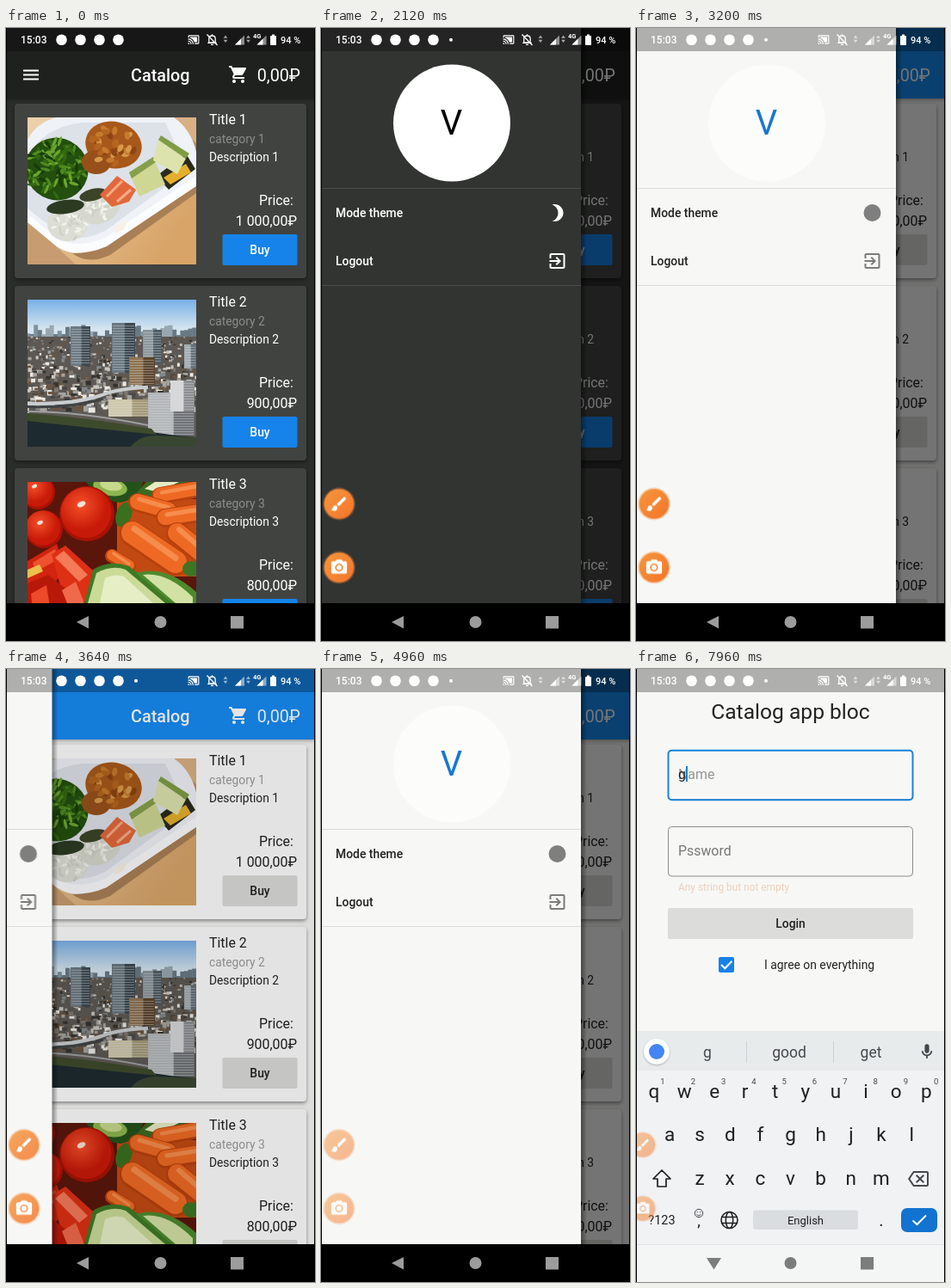
Animation, 359 px wide and 713 px high, one loop 8 s. Source, as an HTML page:

```html
<!DOCTYPE html>
<html lang="en">
<head>
<meta charset="utf-8">
<title>Catalog app bloc</title>
<style>
html, body { margin: 0; width: 100%; height: 100%; overflow: hidden; background: #000; }
svg { display: block; position: absolute; left: 0; top: 0; }
text { font-family: Roboto, "Open Sans", sans-serif; white-space: pre; }
.card { filter: drop-shadow(0 2px 2px rgba(0, 0, 0, .42)); }
</style>
</head>
<body>
<svg id="stage" width="359" height="713" viewBox="0 0 359 713"></svg>
<script>
const LOOP = 8000;
const stage = document.getElementById('stage');

// name: [dark, light]
const theme = {
  bar: ['#1f211f', '#168bf3'],
  page: ['#2b2d2b', '#f7f8f6'],
  card: ['#414341', '#fdfefd'],
  ink: ['#ffffff', '#212221'],
  sub: ['#8b8d8b', '#9a9b9a'],
  btn: ['#1683ea', '#dcdddb'],
  panel: ['#323432', '#f7f8f6'],
  face: ['#fefffe', '#fcfdfb'],
  letter: ['#000000', '#1976d2'],
  line: ['#4a4c4a', '#dcdddb'],
  icon: ['#ffffff', '#7b7c7b']
};

const rect = (x, y, w, h, fill, more = '') =>
  `<rect x="${x}" y="${y}" width="${w}" height="${h}" fill="${fill}" ${more}/>`;
const disc = (x, y, r, fill, more = '') =>
  `<circle cx="${x}" cy="${y}" r="${r}" fill="${fill}" ${more}/>`;
const oval = (x, y, rx, ry, fill, turn = 0) =>
  `<ellipse cx="${x}" cy="${y}" rx="${rx}" ry="${ry}" fill="${fill}" transform="rotate(${turn} ${x} ${y})"/>`;
const path = (d, fill, more = '') => `<path d="${d}" fill="${fill}" ${more}/>`;
const line = (d, color, w, more = '') =>
  path(d, 'none', `stroke="${color}" stroke-width="${w}" ${more}`);
const text = (x, y, size, str, fill, more = '') =>
  `<text x="${x}" y="${y}" font-size="${size}" fill="${fill}" ${more}>${str}</text>`;
const group = (id, body, more = '') => `<g id="${id}" ${more}>${body}</g>`;
const at = (x, y, body) => `<g transform="translate(${x} ${y})">${body}</g>`;
const MID = 'text-anchor="middle" ', END = 'text-anchor="end" ', BOLD = 'font-weight="500"';

const icons = {
  cart: 'M7 18c-1.1 0-2 .9-2 2s.9 2 2 2 2-.9 2-2-.9-2-2-2zM1 2v2h2l3.6 7.6-1.35 2.44C4.5 15.4 5.5 17 7 17h12v-2H7.4l-.2-.4.9-1.6h7.45c.75 0 1.4-.4 1.75-1L20.9 5.5A1 1 0 0 0 20 4H5.2l-.93-2zM17 18c-1.1 0-2 .9-2 2s.9 2 2 2 2-.9 2-2-.9-2-2-2z',
  moon: 'M9 2c-1.05 0-2.05.16-3 .46 4.06 1.27 7 5.06 7 9.54s-2.94 8.27-7 9.54c.95.3 1.95.46 3 .46 5.52 0 10-4.48 10-10S14.52 2 9 2z',
  exit: 'M10.1 15.6 11.5 17l5-5-5-5-1.4 1.4L12.7 11H3v2h9.7zM19 3H5c-1.1 0-2 .9-2 2v4h2V5h14v14H5v-4H3v4c0 1.1.9 2 2 2h14c1.1 0 2-.9 2-2V5c0-1.1-.9-2-2-2z',
  mic: 'M12 14c1.66 0 3-1.34 3-3V5c0-1.66-1.34-3-3-3S9 3.34 9 5v6c0 1.66 1.34 3 3 3zm5-3c0 2.76-2.24 5-5 5s-5-2.24-5-5H5c0 3.53 2.6 6.43 6 6.92V21h2v-3.08c3.4-.49 6-3.39 6-6.92z',
  erase: 'M22 3H7c-.7 0-1.23.35-1.6.88L0 12l5.4 8.1c.37.54.9.9 1.6.9h15c1.1 0 2-.9 2-2V5c0-1.1-.9-2-2-2zm0 16H7.07L2.4 12l4.66-7H22zM10.4 17l3.6-3.6 3.6 3.6 1.4-1.4-3.6-3.6L19 8.4 17.6 7 14 10.6 10.4 7 9 8.4l3.6 3.6L9 15.6z',
  camera: 'M12 15.2a3.2 3.2 0 1 0 0-6.4 3.2 3.2 0 0 0 0 6.4zM9 2 7.2 4H4c-1.1 0-2 .9-2 2v12c0 1.1.9 2 2 2h16c1.1 0 2-.9 2-2V6c0-1.1-.9-2-2-2h-3.2L15 2zm3 15c-2.76 0-5-2.24-5-5s2.24-5 5-5 5 2.24 5 5-2.24 5-5 5z',
  brush: 'M7 14c-1.66 0-3 1.34-3 3 0 1.3-1.16 2-2 2 .92 1.22 2.5 2 4 2 2.2 0 4-1.8 4-4 0-1.66-1.34-3-3-3zM20.7 4.6l-1.3-1.3a1 1 0 0 0-1.4 0l-9 9L11.75 15l9-9a1 1 0 0 0 0-1.4z',
  cast: 'M21 3H3c-1.1 0-2 .9-2 2v3h2V5h18v14h-7v2h7c1.1 0 2-.9 2-2V5c0-1.1-.9-2-2-2zM1 18v3h3c0-1.66-1.34-3-3-3zm0-4v2c2.76 0 5 2.24 5 5h2c0-3.87-3.13-7-7-7zm0-4v2a9 9 0 0 1 9 9h2c0-6-4.93-11-11-11zM5 7v1.6c4 1.3 7 4.4 8.4 8.4H19V7z'
};
// a 24-unit icon centred on x, y
const icon = (name, x, y, size, fill) =>
  `<path d="${icons[name]}" fill="${fill}" fill-rule="evenodd" transform="translate(${x - size / 2} ${y - size / 2}) scale(${size / 24})"/>`;

let seed = 7;
const rnd = () => (seed = (seed * 16807) % 2147483647) / 2147483647;
const pick = list => list[Math.floor(rnd() * list.length)];
// small ovals strewn inside a larger one
function strew(n, x, y, rx, ry, long, thin, tones) {
  let s = '';
  for (let i = 0; i < n; i++) {
    const a = rnd() * 6.28, r = Math.sqrt(rnd());
    s += oval((x + rx * r * Math.cos(a)).toFixed(1), (y + ry * r * Math.sin(a)).toFixed(1), long, thin, pick(tones), Math.round(rnd() * 180));
  }
  return s;
}

function meal() {
  const rice = ['#f3f3ee', '#cfd0c6', '#e6e7df'];
  return rect(0, 0, 196, 171, 'url(#wood)') +
    path('M128 0H196V66z', '#c08c5a') + path('M160 0H196V30z', '#d9b083') +
    path('M0 120 56 171H0z', '#c79c70') +
    path('M0 26Q10 6 34 0H170Q190 14 196 40V80L92 150Q58 166 34 150L0 122z', '#eff2f7') +
    path('M0 44Q22 10 64 6H160L186 62 90 132Q56 148 36 134L0 106z', '#dde1e8') +
    path('M0 112 34 140Q56 154 90 140L196 68V80L92 150Q58 166 34 150L0 122z', '#fbfcfe') +
    path('M52 158Q74 158 92 150L196 80V88L96 160Q70 172 52 158z', '#a97f55') +
    oval(47, 123, 24, 21, '#dcddd4', -10) + strew(40, 47, 124, 22, 18, 3.5, 1.5, rice) +
    oval(84, 104, 25, 19, '#d6d8cd', -25) + strew(40, 84, 104, 22, 16, 3.5, 1.5, rice) +
    oval(44, 104, 22, 8, '#2c3a22', -8) + oval(76, 90, 16, 7, '#3b4428', -14) +
    path('M84 90 104 68 126 84 118 98 98 104z', '#e2683c') + line('M92 92 110 74M104 98 120 84', '#f6ab86', 3) +
    path('M150 68 184 42 195 60 164 84z', '#2b2a1c') + path('M158 70 184 54 190 64 166 78z', '#e4b02c') +
    oval(34, 60, 37, 36, '#234f0f', 40) + strew(90, 33, 60, 35, 33, 6, 1.8, ['#4f8a20', '#173d0a', '#6ba52f', '#33690f']) +
    oval(100, 32, 33, 27, '#a8581a', 14) + oval(80, 52, 17, 14, '#98501a') +
    strew(34, 100, 32, 28, 22, 5, 3, ['#c67a2c', '#8c4412', '#d8994a', '#b4651f']) +
    path('M118 64 146 46 160 78 130 92z', '#cfd794') + path('M118 64 146 46 149 52 121 71z', '#86a04a') +
    path('M152 26 184 48 174 66 146 50z', '#dce3ac') + path('M152 26 184 48 188 42 155 21z', '#7f9c44') +
    path('M100 128 116 120 112 130 102 135z', '#f9f1e6');
}

function city() {
  const tones = ['#4c4844', '#c9c6bf', '#7f776e', '#a7a39d', '#36332f', '#eceae5', '#6b543f', '#82878a'];
  let s = rect(0, 0, 196, 171, 'url(#sky)');
  for (let i = 0; i < 44; i++) {
    const h = 4 + rnd() * 13;
    s += rect(i * 4.6 - 2, 46 - h, 5, h, pick(['#7f929f', '#687984', '#98a7b0']));
  }
  s += rect(0, 43, 196, 128, '#5d5853');
  for (let i = 0; i < 700; i++) {
    const y = 42 + i / 700 * 84, k = 1.5 + (y - 40) / 22;
    s += rect((rnd() * 200 - 4).toFixed(1), y.toFixed(1), (k * (.7 + rnd())).toFixed(1), (k * (.5 + rnd())).toFixed(1), pick(tones));
  }
  const tower = (x, y, w, h, fill, shade) => {
    s += rect(x, y, w, h, fill) + rect(x + w * .55, y, w * .45, h, shade);
    for (let j = 3; j < h - 1; j += 3) s += rect(x + 1, y + j, w - 2, 1, '#d4d9dc', 'opacity=".4"');
  };
  tower(50, 31, 23, 46, '#6d7a83', '#404c54');
  tower(98, 27, 27, 58, '#6b7881', '#3e4a52');
  tower(134, 35, 22, 40, '#8b969d', '#505d66');
  tower(118, 67, 30, 32, '#8f7350', '#5c452c');
  tower(182, 52, 14, 28, '#a2abb0', '#667077');
  tower(94, 116, 50, 20, '#cfc8ab', '#a69a79');
  tower(140, 108, 54, 50, '#b4b7b9', '#6f7377');
  tower(166, 94, 28, 36, '#d6d8d8', '#8b8f92');
  return s + path('M0 137Q60 143 144 154 170 158 196 160V171H0z', '#1d2a2f') +
    path('M0 132Q60 136 144 150L150 157Q70 149 0 141z', '#3d4a2c') +
    line('M0 121Q54 122 86 111 106 103 140 102', '#c9cdcf', 4) +
    line('M0 124.5Q56 126 88 115', '#3f4345', 3) +
    line('M0 130Q60 130 140 146', '#9c9f9e', 2) +
    path('M120 171Q130 158 150 158L196 160V171z', '#3a4730');
}

function veg() {
  const carrot = (x1, y1, x2, y2, w) =>
    line(`M${x1} ${y1}L${x2} ${y2}`, '#b8400c', w + 2, 'stroke-linecap="round"') +
    line(`M${x1} ${y1 - 1}L${x2} ${y2 - 1}`, '#ee6a24', w - 2, 'stroke-linecap="round"') +
    line(`M${x1 + 2} ${y1 - w * .2}L${x2} ${y2 - w * .2}`, '#f68d4c', w * .25, 'stroke-linecap="round"');
  const tomato = (x, y, r) => disc(x, y, r, '#a81205') + disc(x - 1, y - 1.5, r * .92, 'url(#tomato)') +
    oval(x - r * .2, y - r * .35, r * .16, r * .1, '#fde0d6', -25);
  return rect(0, 0, 196, 171, '#5a160b') + rect(104, 20, 92, 90, '#c24a12') +
    path('M68 0H134Q130 20 108 24 84 22 68 0z', '#24521a') + oval(96, 6, 20, 10, '#8db64e', 10) + oval(97, 4, 13, 6, '#c6d98c', 10) +
    path('M122 18 138 0H196V14L150 20z', '#3c6a22') + path('M136 8 148 0H176L152 12z', '#e6ebc2') +
    tomato(12, 12, 20) + tomato(19, 55, 22) + tomato(69, 37, 32) +
    oval(112, 38, 9, 15, '#39701f', 20) +
    carrot(154, 16, 200, 8, 18) + carrot(128, 24, 164, 34, 20) +
    carrot(160, 42, 200, 36, 20) + carrot(174, 60, 204, 84, 24) +
    carrot(122, 60, 172, 94, 28) + carrot(98, 86, 118, 98, 14) +
    path('M0 92 34 72 44 104 20 128 0 124z', '#d2240f') + path('M6 94 32 78 36 90 10 104z', '#ef5230') +
    path('M28 84 44 74 86 112 70 141 40 128z', '#dd3014') + path('M32 88 42 80 70 108 60 116z', '#f47a58') +
    path('M0 118 24 108 66 141V171H0z', '#b81808') + path('M4 130 22 120 30 171H8z', '#ec4a28') +
    path('M40 126 56 116 66 141H46z', '#f0694a') +
    path('M0 102 14 96 18 104 0 112z', '#ecc04a') +
    path('M76 102Q96 90 118 98L172 141H66z', '#3f7a26') + path('M80 106Q98 96 114 102L160 141H70z', '#cadb98') +
    path('M90 112Q102 106 112 110L146 141H84z', '#e6eec6') +
    path('M126 106Q160 96 196 128V141H168z', '#4d8a2e') + path('M134 108Q162 104 192 134V141H172z', '#d2e1a4') +
    oval(190, 101, 10, 9, '#3f7424');
}

function card(i, price, photo) {
  return at(0, i * 212,
    rect(10, 88, 339, 203, 'var(--card)', 'rx="4" class="card"') +
    at(25, 104, `<g clip-path="url(#frame)">${photo}</g>`) +
    text(236, 112, 15.9, 'Title ' + (i + 1), 'var(--ink)') +
    text(236, 134, 13.8, 'category ' + (i + 1), 'var(--sub)') +
    text(236, 155, 13.8, 'Description ' + (i + 1), 'var(--ink)') +
    text(294, 206, 15.9, 'Price:', 'var(--ink)') +
    text(338, 230, 15.9, price + '₽', 'var(--ink)', END) +
    rect(251.5, 240, 87, 36, 'var(--btn)', 'rx="2"') +
    text(295, 263, 13.9, 'Buy', 'var(--ink)', MID + BOLD));
}

const catalog = () => rect(0, 0, 359, 713, 'var(--page)') +
  card(0, '1 000,00', meal()) + card(1, '900,00', city()) + card(2, '800,00', veg()) +
  rect(0, 0, 359, 82, 'var(--bar)', 'style="filter:drop-shadow(0 1px 2px rgba(0,0,0,.35))"') +
  [48.5, 53.5, 58.5].map(y => rect(20, y, 18, 2, '#fff')).join('') +
  text(145, 62, 19.8, 'Catalog', '#fff', BOLD) +
  icon('cart', 270, 54, 24, '#fff') + text(342, 62, 19.8, '0,00₽', '#fff', END);

const drawer = () => rect(302, 0, 7, 713, 'url(#edge)') + rect(0, 0, 302, 713, 'var(--panel)') +
  disc(152, 110.5, 68, 'var(--face)') + text(151.5, 124, 40, 'V', 'var(--letter)', MID) +
  rect(0, 186, 302, 1, 'var(--line)') + rect(0, 299, 302, 1, 'var(--line)') +
  text(17, 220, 13.9, 'Mode theme', 'var(--ink)', BOLD) + text(17, 276, 13.9, 'Logout', 'var(--ink)', BOLD) +
  group('moon', icon('moon', 274.5, 215, 24, '#fff')) +
  group('sun', disc(274.5, 215, 10, '#7e7f7e')) + icon('exit', 274.5, 271, 24, 'var(--icon)');

const field = (y, more) => rect(37.5, y, 284, 57.5, 'none', 'rx="4" ' + more);
const login = () => rect(0, 0, 359, 713, '#f7f8f6') +
  text(179.5, 58, 24.6, 'Catalog app bloc', '#212221', MID) +
  field(94.5, 'stroke="#8b8c8b"') + group('focus', field(94.8, 'stroke="#1a82dc" stroke-width="2"')) +
  group('hint', text(49, 128, 15.9, 'Name', '#777877')) +
  group('typed', text(49, 128, 15.9, 'g', '#212221') + text(49, 258, 11.9, 'Any string but not empty', '#ecd0bc')) +
  group('caret', rect(49, 113, 2, 18, '#1a82dc')) +
  field(183.5, 'stroke="#8b8c8b"') + text(49, 217, 15.9, 'Pssword', '#777877') +
  rect(37, 278, 285, 36, '#dcdddb', 'rx="2"') + text(179.5, 301, 13.9, 'Login', '#212221', MID + BOLD) +
  rect(96, 335, 18, 18, '#1681ea', 'rx="2"') + line('M99 344 103.3 348.3 111.5 339.7', '#fff', 2) +
  text(149, 349, 13.9, 'I agree on everything', '#212221');

function keyboard() {
  const ink = '#1d1f20', soft = '#45494b';
  const row = (keys, x, y) => [...keys].map((k, i) => text(x + i * 35.15, y, 22.5, k, ink, MID)).join('');
  return rect(0, 421, 359, 292, '#f0f2f3') + rect(0, 421, 359, 46, '#e8ebec') +
    disc(24, 445, 15, '#fff', 'style="filter:drop-shadow(0 1px 1px rgba(0,0,0,.25))"') + disc(24, 445, 9, '#4285f4') +
    icon('mic', 338, 445, 21, soft) +
    group('words', rect(128, 433, 1, 25, '#cdd1d3') + rect(229, 433, 1, 25, '#cdd1d3') +
      text(83, 452, 17.5, 'g', soft, MID) + text(178, 452, 17.5, 'good', soft, MID) + text(273, 452, 17.5, 'get', soft, MID)) +
    row('qwertyuiop', 21, 499) + row('asdfghjkl', 39, 549) + row('zxcvbnm', 74, 600) +
    [...'1234567890'].map((k, i) => text(31 + i * 35.3, 483, 9.5, k, soft, MID)).join('') +
    path('M30 583 40 593H35V602H25V593H20z', 'none', `stroke="${ink}" stroke-width="1.7" stroke-linejoin="round"`) +
    icon('erase', 328, 593, 24, soft) +
    text(30, 646, 14.5, '?123', ink, MID) + text(73, 648, 18, ',', ink, MID) +
    disc(73, 633, 4.7, 'none', `stroke="${soft}"`) + line('M70.5 634.5Q73 637.5 75.5 634.5M71.2 631v1.4M74.8 631v1.4', soft, 1) +
    disc(108.5, 641, 9.5, 'none', `stroke="${ink}" stroke-width="1.6"`) +
    `<ellipse cx="108.5" cy="641" rx="4.2" ry="9.5" fill="none" stroke="${ink}" stroke-width="1.5"/>` +
    line('M100 637.5H117M100 644.5H117', ink, 1.5) +
    rect(136, 629.5, 122, 22.5, '#dadddf', 'rx="3"') + text(197, 646, 13, 'English', ink, MID) +
    text(285, 648, 20, '.', ink, MID) +
    rect(308, 627, 42, 28, '#1273d0', 'rx="7"') + line('M321.5 641.5 326.5 646 337 635.5', '#fff', 2);
}

function status() {
  const w = '#fff', arrows = x => path(`M${x} 8.5l2.4 3.2h-4.8zM${x} 17l2.4-3.2h-4.8z`, w, 'opacity=".6"');
  const signal = x => path(`M${x} 19.5h11v-11z`, w, 'opacity=".5"') + path(`M${x} 19.5h7v-7z`, w);
  return rect(0, 0, 359, 27, '#000', 'opacity=".29"') +
    text(17, 18.3, 12, '15:03', w, BOLD) +
    [64.5, 86.5, 108.5, 130.5].map(x => disc(x, 13.7, 6.3, w)).join('') +
    group('dot', disc(151, 13.7, 2, w)) +
    icon('cast', 218, 13.5, 14, w) +
    line('M235.8 17V12.5Q235.8 9 239.5 9T243.2 12.5V17zM234.3 17.3H244.7M239.5 7.2V9M238 19.3H241', w, 1.3) +
    line('M233.5 7.5 245.5 20', w, 1.3) +
    arrows(255) + signal(266) + arrows(281.5) + signal(291.5) +
    text(287, 12, 7.5, '4G', w, 'font-weight="700"') +
    rect(307, 9, 7, 11, w, 'rx="1"') + rect(309, 7.5, 3, 2, w) +
    text(319, 18, 11, '94 %', w, BOLD);
}

const marks = (back, fill) => path(back, fill) + disc(179.5, 691, 7, fill) + rect(261, 684, 15, 14.5, fill);
const floater = (id, y, name) => at(0, y, group(id,
  disc(0, 0, 18.8, '#f58a3c', 'opacity=".4"') + disc(0, 0, 17.2, 'url(#amber)') + icon(name, 0, 0, 22, '#fff'), 'class="float"'));
const stops = (a, b) => `<stop stop-color="${a}"/><stop offset="1" stop-color="${b}"/>`;
const grad = (id, dir, a, b) => `<linearGradient id="${id}" x1="0" y1="0" ${dir}>${stops(a, b)}</linearGradient>`;

stage.innerHTML = '<defs>' +
  grad('sky', 'x2="0" y2=".2"', '#79b0e6', '#d6e5ef') +
  grad('wood', 'x2="1" y2=".6"', '#ecd2ae', '#d8a468') +
  grad('edge', 'x2="1" y2="0"', 'rgba(0,0,0,.4)', 'rgba(0,0,0,0)') +
  grad('amber', 'x2="1" y2="1"', '#f6963c', '#f4752a') +
  `<radialGradient id="tomato" cx=".4" cy=".35">${stops('#f4502a', '#c81a08')}</radialGradient>` +
  '<clipPath id="frame"><rect width="196" height="171"/></clipPath></defs>' +
  catalog() + group('scrim', rect(0, 0, 359, 713, '#000')) +
  group('drawer', drawer()) + group('login', login()) + group('keys', keyboard()) + status() +
  rect(0, 669, 359, 44, '#000') + marks('M82 691 96 684V698.5z', '#9b9c9b') +
  group('navlight', rect(0, 669, 359, 44, '#f4f6f6') + rect(0, 669, 359, 1, '#e2e5e6') + marks('M82 685H99L90.5 698.5z', '#7b7c7c')) +
  floater('paint', 553.5, 'brush') + floater('snap', 627.5, 'camera') +
  rect(0, 0, 1, 713, '#000') + rect(358, 0, 1, 713, '#000');

// steps: [time, value, easing to the next step]
function track(target, prop, steps) {
  const all = [[0, steps[0][1]], ...steps, [LOOP, steps[steps.length - 1][1]]];
  const frames = all.map(([t, v, easing = 'linear']) => ({ offset: t / LOOP, [prop]: v, easing }));
  for (const el of document.querySelectorAll(target)) el.animate(frames, { duration: LOOP, iterations: Infinity });
}
const cut = (target, t, from, to) => track(target, 'opacity', [[t, from], [t, to]]);

for (const [name, [dark, light]] of Object.entries(theme)) {
  CSS.registerProperty({ name: '--' + name, syntax: '<color>', inherits: true, initialValue: dark });
  track('#stage', '--' + name, [[2160, dark], [2400, light]]);
}
cut('#moon', 2280, 1, 0);
cut('#sun', 2280, 0, 1);
cut('#dot', 240, 0, 1);

const OUT = 'cubic-bezier(.2,.6,.35,1)';
const slide = (target, prop, shut, open) => track(target, prop, [
  [900, shut, OUT], [1200, open], [3520, open, OUT], [3820, shut], [4480, shut, OUT], [4800, open]]);
slide('#scrim', 'opacity', 0, .54);
slide('#drawer', 'transform', 'translateX(-310px)', 'translateX(0px)');

track('#login', 'opacity', [[5560, 0], [5800, 1]]);
track('#login', 'transform', [[5560, 'translateY(60px)', OUT], [5880, 'translateY(0px)']]);

const spot = (x, k) => `translateX(${x}px) scale(${k})`;
track('.float', 'transform', [[80, spot(-22, 1), OUT], [480, spot(21, 1)], [5600, spot(21, 1), 'ease-in-out'], [6040, spot(8, .82)]]);
track('.float', 'opacity', [[3560, 1], [3800, .5]]);

track('#focus', 'opacity', [[7120, 0], [7280, 1]]);
cut('#caret', 7200, 0, 1);
track('#caret', 'transform', [[7960, 'translateX(0px)'], [7960, 'translateX(9px)']]);
track('#keys', 'transform', [[7280, 'translateY(250px)', OUT], [7640, 'translateY(0px)']]);
track('#keys', 'opacity', [[7280, 0], [7400, 1]]);
track('#navlight', 'opacity', [[7280, 0], [7400, 1]]);
cut('#hint', 7960, 1, .78);
cut('#typed', 7960, 0, 1);
cut('#words', 7960, 0, 1);
</script>
</body>
</html>
```
